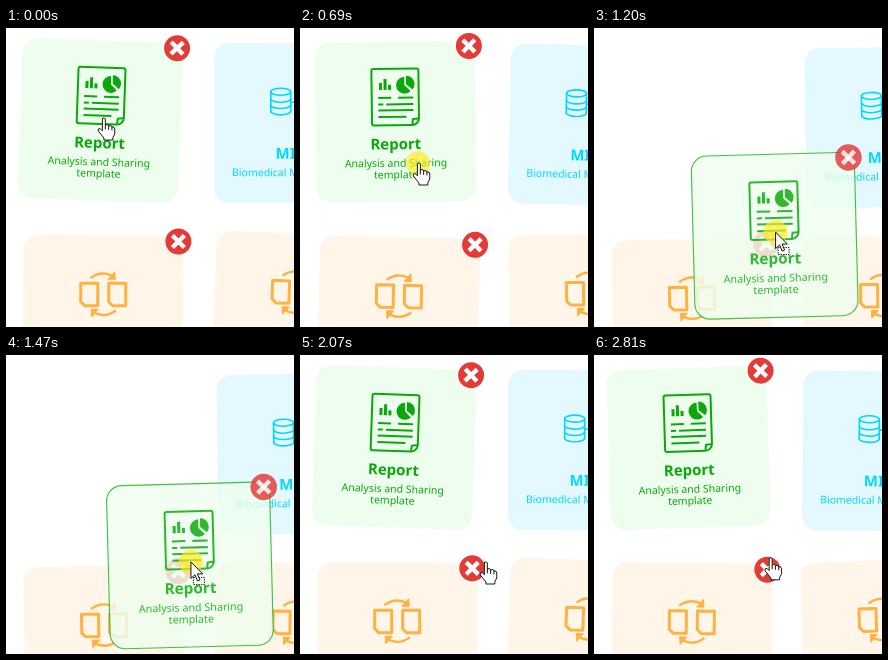
An HTML page with a canvas that plays this animation: 288x299 px, repeating every 2.84 s.

```html
<!DOCTYPE html>
<html lang="en">
<head>
<meta charset="utf-8">
<title>Jiggling cards</title>
<style>
html, body { margin: 0; width: 100%; height: 100%; overflow: hidden; background: #fff; }
canvas { display: block; width: 288px; height: 299px; }
</style>
</head>
<body>
<canvas id="stage" width="288" height="299"></canvas>
<script>
const canvas = document.getElementById('stage');
const dpr = window.devicePixelRatio || 1;
canvas.width = 288 * dpr;
canvas.height = 299 * dpr;
const ctx = canvas.getContext('2d');

const LOOP = 2840, SWING = 516, BOUNCE = 258;
const DRAG_START = 830, DROP = 1560, RETURN = 1870;
const FONT = '"Noto Sans", "Open Sans", sans-serif';
const GREEN = '#0aa80a', CYAN = '#00d9ff', ORANGE = '#ffb142';
const TAU = Math.PI * 2, RAD = Math.PI / 180;

// time, x, y of the pointer's hot spot
const path = [
  [0, 97, 90], [160, 97, 90], [560, 118, 135], [830, 118, 135],
  [1170, 181.5, 204], [1500, 185, 207], [2400, 185, 207],
  [2530, 184, 207], [2800, 176, 203], [LOOP, 175, 202]
];
// time, x, y of the dragged card's centre
const dragPath = [[830, 95, 94], [1170, 180.6, 207.8], [1500, 184, 210.5], [LOOP, 184, 210.5]];

const smooth = k => k * k * (3 - 2 * k);

function along(keys, t) {
  let i = 0;
  while (i < keys.length - 2 && t >= keys[i + 1][0]) i++;
  const [t0, x0, y0] = keys[i], [t1, x1, y1] = keys[i + 1];
  const k = smooth(Math.min(1, Math.max(0, (t - t0) / (t1 - t0))));
  return { x: x0 + (x1 - x0) * k, y: y0 + (y1 - y0) * k };
}

function swing(t) {
  const a = TAU * t / SWING - 11 * RAD;
  const v = (1 - Math.cos(2 * a)) / 2;
  return { dx: 1.5 * v, dy: 1.5 * v, angle: 2 * Math.cos(a) };
}

// the tilt falls out of step with the hop while a card is away
function bounce(t, away) {
  const u = (1 + Math.cos(TAU * (t / BOUNCE - 0.62))) / 2;
  const angle = away ? 1.4 * Math.cos(TAU * (t / BOUNCE - 0.04)) : 1.3 * u;
  return { dx: 1.5 * u, dy: 2.2 * u, angle };
}

function line(...p) {
  ctx.beginPath();
  for (let i = 0; i < p.length; i += 2) ctx.lineTo(p[i], p[i + 1]);
  ctx.stroke();
}

function shape(points, fill, stroke) {
  ctx.beginPath();
  points.forEach(([x, y]) => ctx.lineTo(x, y));
  ctx.closePath();
  if (fill) { ctx.fillStyle = fill; ctx.fill(); }
  if (stroke) { ctx.strokeStyle = stroke; ctx.stroke(); }
}

function text(str, x, y, size, weight, color, align) {
  ctx.font = `${weight} ${size}px ${FONT}`;
  ctx.textAlign = align;
  ctx.fillStyle = color;
  ctx.fillText(str, x, y);
}

function plate(fill, border) {
  ctx.beginPath();
  ctx.roundRect(-80, -80, 160, 160, 15);
  ctx.fillStyle = fill;
  ctx.fill();
  if (border) {
    ctx.strokeStyle = border;
    ctx.lineWidth = 1.1;
    ctx.stroke();
  }
}

function closeButton(x, y) {
  ctx.beginPath();
  ctx.arc(x, y, 13, 0, TAU);
  ctx.fillStyle = '#e23b38';
  ctx.fill();
  ctx.strokeStyle = '#fff';
  ctx.lineWidth = 4.4;
  ctx.lineCap = 'butt';
  line(x - 6, y - 6, x + 6, y + 6);
  line(x - 6, y + 6, x + 6, y - 6);
}

function wedge(x, y, r, from, to) {
  ctx.beginPath();
  ctx.moveTo(x, y);
  ctx.arc(x, y, r, from, to);
  ctx.fill();
}

function reportIcon() {
  ctx.strokeStyle = ctx.fillStyle = GREEN;
  ctx.lineWidth = 2;
  ctx.lineJoin = ctx.lineCap = 'round';
  ctx.beginPath();
  ctx.roundRect(-23.5, -53, 47, 56.5, [2, 2, 7, 2]);
  ctx.stroke();
  line(17, 2, 17.5, -2.5, 22.5, -3);
  ctx.lineCap = 'butt';
  ctx.lineWidth = 3;
  line(-14.5, -39, -14.5, -32);
  line(-10, -43, -10, -32);
  line(-5.5, -37, -5.5, -32);
  wedge(9.5, -36.5, 8.5, TAU / 8, TAU * 3 / 4);
  wedge(11, -37.5, 8.5, -TAU / 4, TAU / 9);
  ctx.strokeStyle = '#eefeee';
  ctx.lineWidth = 1.3;
  line(10.2, -46, 10.2, -37, 17, -30.5);
  ctx.strokeStyle = GREEN;
  ctx.lineWidth = 2;
  line(-17, -24, -4, -24);
  line(3, -24, 18, -24);
  line(-17, -17.5, -12, -17.5);
  line(-9, -17.5, 18, -17.5);
  line(-17, -11.5, 18, -11.5);
  line(-17, -5, 11, -5);
}

function reportCard(border) {
  plate('#eefeee', border);
  reportIcon();
  text('Report', 0, 27.5, 15, 800, GREEN, 'center');
  text('Analysis and Sharing', 0, 45, 10.5, 400, GREEN, 'center');
  text('template', 0, 56.5, 10.5, 400, GREEN, 'center');
  closeButton(74.3, -75);
}

function dataCard() {
  plate('#e3f8ff');
  ctx.strokeStyle = CYAN;
  ctx.lineWidth = 1.6;
  ctx.lineCap = 'round';
  ctx.beginPath();
  ctx.ellipse(-13.5, -31.5, 10, 3.5, 0, 0, TAU);
  ctx.stroke();
  for (let y = -24.5; y < -10; y += 6.3) {
    ctx.beginPath();
    ctx.ellipse(-13.5, y, 10, 3.5, 0, 0, Math.PI);
    ctx.stroke();
  }
  line(-23.5, -31.5, -23.5, -11.9);
  line(-3.5, -31.5, -3.5, -11.9);
  line(-3.5, -21, 3, -21);
  text('MI', -18.5, 35.5, 15, 800, CYAN, 'left');
  text('Biomedical M', -62, 53, 10.5, 400, CYAN, 'left');
}

function arrowArc() {
  ctx.lineWidth = 2.4;
  ctx.beginPath();
  ctx.arc(0, 0, 20.5, -TAU / 4 - 0.62, -TAU / 4 + 0.45);
  ctx.stroke();
  ctx.lineWidth = 1;
  shape([[5, -15], [11.5, -22.5], [12, -15]], ORANGE, ORANGE);
}

function swapCard(button) {
  plate('#fff6e9');
  ctx.save();
  ctx.translate(0, -21);
  ctx.strokeStyle = ORANGE;
  ctx.lineWidth = 3;
  ctx.lineCap = ctx.lineJoin = 'round';
  for (const x of [-22.5, 5.5]) {
    shape([[x, -11], [x + 17, -11], [x + 17, 11.5], [x + 4, 11.5], [x, 7.5]], null, ORANGE);
  }
  arrowArc();
  ctx.rotate(Math.PI);
  arrowArc();
  ctx.restore();
  if (button) closeButton(75, -74);
}

function place(x, y, pose, draw, scale = 1) {
  ctx.save();
  ctx.translate(x + pose.dx, y + pose.dy);
  ctx.rotate(pose.angle * RAD);
  ctx.scale(scale, scale);
  draw();
  ctx.restore();
}

function hand() {
  ctx.scale(0.94, 1);
  ctx.lineWidth = 1;
  ctx.lineJoin = ctx.lineCap = 'round';
  shape([[-1, 1], [0, 0], [1.5, 0], [2.5, 1], [2.5, 7], [5, 6.5], [6, 8], [8.5, 7.5], [9.5, 9],
    [11.5, 9], [12.5, 11], [12.5, 16], [10.5, 19.5], [10.5, 22], [1, 22], [1, 20],
    [-5, 13], [-5, 11], [-3, 10.5], [-1, 12.5]], '#fff', '#111');
  line(2.5, 7, 2.5, 11);
  line(6, 8, 6, 11.5);
  line(9.5, 9, 9.5, 12);
}

function arrow() {
  ctx.lineWidth = 1;
  ctx.lineJoin = 'miter';
  shape([[0, 0], [0, 16.5], [4, 12.8], [6.6, 19], [9, 18], [6.4, 12], [11.8, 12]], '#fff', '#111');
}

function dropBox() {
  ctx.fillStyle = '#fff';
  ctx.fillRect(2.5, 15.5, 11, 7);
  ctx.strokeStyle = '#222';
  ctx.lineWidth = 1;
  ctx.setLineDash([1.5, 1]);
  ctx.strokeRect(2.5, 15.5, 11, 7);
  ctx.setLineDash([]);
}

function pointer(t, away, dragging) {
  const p = along(path, t);
  ctx.save();
  ctx.translate(p.x, p.y);
  if (t >= 600 && t < DROP) {
    ctx.beginPath();
    ctx.arc(0, 0, 12, 0, TAU);
    ctx.fillStyle = 'rgba(255, 235, 30, 0.68)';
    ctx.fill();
  }
  if (dragging) dropBox();
  if (away) arrow();
  else hand();
  ctx.restore();
}

function draw(t) {
  ctx.setTransform(dpr, 0, 0, dpr, 0, 0);
  ctx.fillStyle = '#fff';
  ctx.fillRect(0, 0, 288, 299);
  const away = t >= DRAG_START && t < RETURN;
  const dragging = away && t < DROP;
  const a = swing(t), b = bounce(t, away);
  const sx = away ? 2 : 0, sy = away ? 2 : 0;

  if (!away) place(94.2, 92.5, a, () => reportCard());
  place(288 + sx, 95 + sy, b, dataCard);
  place(97, 287 + sy, b, () => swapCard(true));
  place(288, 285 + sy, a, () => swapCard(false));

  if (dragging) {
    const c = along(dragPath, t);
    ctx.globalAlpha = 0.83;
    place(c.x, c.y, { dx: 0, dy: 0, angle: -1.5 }, () => reportCard('#1fb51f'), 1.02);
    ctx.globalAlpha = 1;
  }
  pointer(t, away, dragging);
}

const start = performance.now();
function tick() {
  draw((performance.now() - start) % LOOP);
  requestAnimationFrame(tick);
}
draw(0);
requestAnimationFrame(tick);
</script>
</body>
</html>
```
